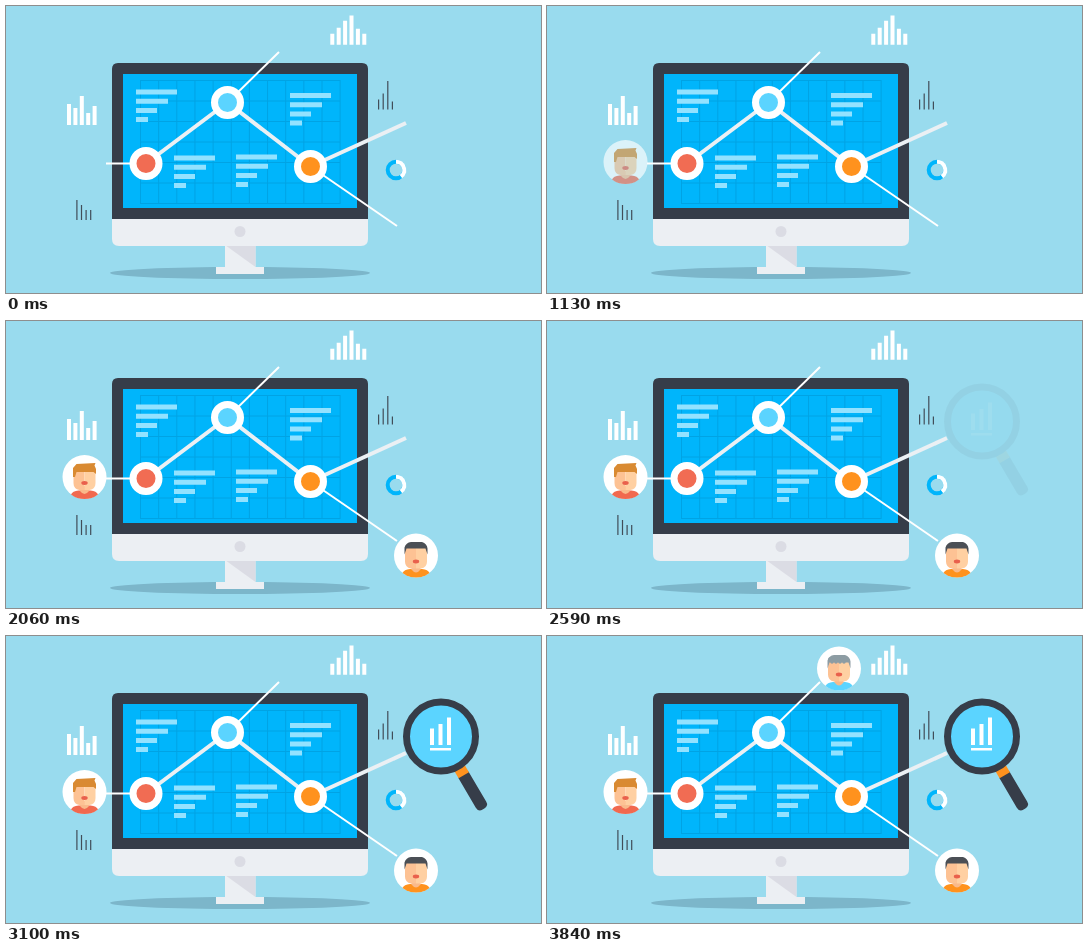
An HTML page for the animation above (8270 ms loop, 535 by 287 pixels).

```html
<!DOCTYPE html>
<html lang="en">
<head>
<meta charset="utf-8">
<title>Data analysis</title>
<style>
html, body { margin: 0; width: 100%; height: 100%; overflow: hidden; background: #99dbee; }
svg { display: block; width: 535px; height: 287px; }
</style>
</head>
<body>
<svg id="stage" viewBox="0 0 535 287">
  <ellipse cx="234" cy="267" rx="130" ry="6" fill="#7cb6ca"/>
  <path d="M219 239H249.500V262H219Z" fill="#eceff3"/>
  <path d="M219 239H249.500V261Z" fill="#dbdce4"/>
  <path d="M210 261H258V268H210Z" fill="#eceff3"/>
  <path d="M106 213V63Q106 57 112 57H356Q362 57 362 63V213Z" fill="#363d49"/>
  <path d="M106 213H362V233Q362 240 355 240H113Q106 240 106 233Z" fill="#eceff3"/>
  <circle cx="234" cy="225.500" r="5.500" fill="#dbdce4"/>
  <path d="M117 68H351V202H117Z" fill="#00b5fb"/>
  <path id="grid" fill="none" stroke="#00a3e4"/>
  <path id="notes" fill="#93e2ff"/>
  <g fill="none" stroke="#fff" stroke-width="2">
    <path d="M100 157.500H140M221.500 96.500L273 46M304.500 160.500L391 220"/>
    <path d="M140 157.500L221.500 96.500L304.500 160.500L400 117" stroke="#ebf0f4" stroke-width="4"/>
  </g>
  <g stroke="#fff" stroke-width="7">
    <circle cx="140" cy="157.500" r="13" fill="#f16c53"/>
    <circle cx="221.500" cy="96.500" r="13" fill="#5bd4ff"/>
    <circle cx="304.500" cy="160.500" r="13" fill="#ff921e"/>
  </g>
  <path id="bars" fill="#fff"/>
  <path id="ticks" fill="#414d58"/>
  <g fill="none" stroke-width="4">
    <circle cx="390" cy="164" r="8.300" stroke="#00b5fb"/>
    <path d="M390 155.700A8.300 8.300 0 0 1 395 170.600" stroke="#fff"/>
  </g>
  <g id="people"></g>
  <g id="lens" opacity="0">
    <g transform="translate(435 100.500) rotate(59.600)">
      <path d="M44 -6H79Q84 -6 84 -1V1Q84 6 79 6H44Z" fill="#363d49"/>
      <path d="M36 -6H45V6H36Z" fill="#ff921e"/>
    </g>
    <circle cx="435" cy="100.500" r="34.500" fill="#5bd4ff" stroke="#363d49" stroke-width="7"/>
    <path d="M424 92.500h4V109h-4ZM432.500 88h4V109h-4ZM441 81.500h4V109h-4ZM424 112h21v2.500h-21Z" fill="#fff"/>
  </g>
</svg>
<script>
const $ = id => document.getElementById(id);
const box = (x, y, w, h) => `M${x} ${y}h${w}v${h}h${-w}Z`;
const chart = (x, base, step, w, heights) =>
  heights.map((h, i) => box(x + i * step, base - h, w, h)).join("");
const note = (x, y) =>
  [41, 32, 21, 12].map((w, i) => box(x, y + i * 9.2, w, 5)).join("");

let grid = "";
for (let i = 0; i < 12; i++) grid += `M${134.5 + i * 18.15} 74V198`;
for (let i = 0; i < 7; i++) grid += `M134 ${74.5 + i * 20.5}H334`;
$("grid").setAttribute("d", grid);

$("notes").setAttribute("d",
  note(130, 83.5) + note(284, 87) + note(168, 149.5) + note(230, 148.5));
$("bars").setAttribute("d",
  chart(61, 119, 6.4, 4, [21, 17, 29, 12, 19]) +
  chart(324.3, 38.8, 6.4, 4, [11, 17, 24, 29.3, 16, 11]));
$("ticks").setAttribute("d",
  chart(70.3, 214, 4.6, 1.2, [20, 15, 10, 10]) +
  chart(372, 103.5, 4.6, 1.2, [10, 16, 28.5, 8]));

// Each portrait is drawn around the centre of its disc.
function person(id, x, y, shirt, hair) {
  $("people").innerHTML += `<g id="${id}" transform="translate(${x} ${y})" opacity="0">
    <circle r="22" fill="#fff"/>
    <path d="M-13.500 17.400Q-12 14 -6 13.500H6Q12 14 13.500 17.400A22 22 0 0 1 -13.500 17.400Z" fill="${shirt}"/>
    <path d="M-4.500 9H4.500V14Q0 20 -4.500 14Z" fill="#f9b98b"/>
    <path d="M-11 -8H0V13H-5Q-11 12 -11 6Z" fill="#fdc294"/>
    <path d="M0 -8H11V6Q11 12 5 13H0Z" fill="#ffd0a2"/>
    <ellipse cy="6" rx="3.200" ry="1.900" fill="#e9604c"/>
    ${hair}</g>`;
}
person("left", 78.5, 156, "#f1694f",
  '<path d="M-11.500 0V-9L-8 -13L11 -14L10 -11.500L11.500 -8V-3L9 -5H-8L-9.500 0Z" fill="#d98a32"/>');
person("right", 410, 234.5, "#ff921e",
  '<path d="M-11.500 -1V-8Q-10 -13 -5 -13.500H6Q11 -12 11.500 -7V-1L9.500 -7H-9.500Z" fill="#4b4f55"/>');
person("top", 292, 32.5, "#5bd4ff",
  '<path d="M-11.500 0V-8Q-10 -13 -5 -13.500H6Q11 -12 11.500 -7V0L9.500 -6H-9.500Z" fill="#8d9ca3"/>' +
  '<path d="M-9 -9.500H10M-7 -6.500H9" stroke="#8d9ca3" stroke-width="3.500" stroke-linecap="round" stroke-dasharray="0 4"/>');

const LOOP = 8270, TICK = 30;
const fades = [["left", 830, 17], ["right", 1670, 14], ["lens", 2590, 18], ["top", 3390, 16]];

function draw() {
  const t = performance.now() % LOOP;
  for (const [id, start, steps] of fades) {
    const step = Math.floor((t - start) / TICK) + 1;
    $(id).setAttribute("opacity", Math.min(1, Math.max(0, step / steps)));
  }
  requestAnimationFrame(draw);
}
draw();
</script>
</body>
</html>
```
